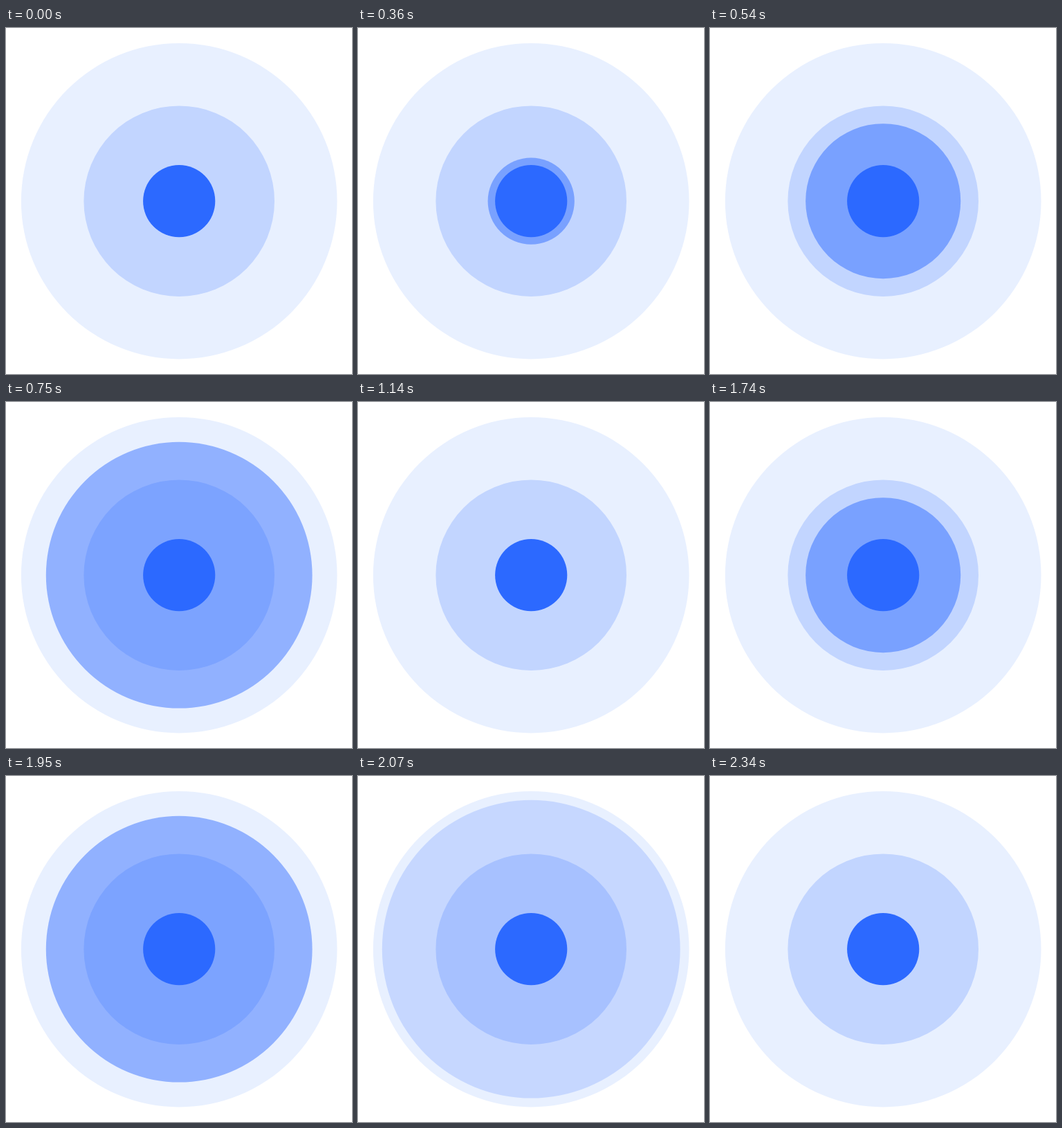
An HTML page for the animation above (2400 ms loop, 500 by 500 pixels).

```html
<!DOCTYPE html>
<html lang="en">
<head>
<meta charset="utf-8">
<title>Pulse</title>
<style>
  html, body { margin: 0; width: 100%; height: 100%; overflow: hidden; background: #fff; }
  svg { display: block; width: 100%; height: 100%; }
  circle { cx: 250.2px; cy: 250.2px; }
  .outer { r: 228.3px; fill: #e8f0ff; }
  .middle { r: 137.8px; fill: #c2d5ff; }
  .core, .pulse { fill: #2c69ff; }
  .core { r: 52.1px; }
  .pulse { r: 51.6px; opacity: .48; }
</style>
</head>
<body>
<svg viewBox="0 0 500 500">
  <circle class="outer"/>
  <circle class="middle"/>
  <circle class="pulse"/>
  <circle class="core"/>
</svg>
<script>
  const PERIOD = 1200;
  const STEP = 30;
  const EASE = 'cubic-bezier(.5, 0, .5, 1)';
  const pulse = document.querySelector('.pulse');

  // Hold `from` until `start`, ease to `to` by `end`, then hold.
  function tween(property, from, to, start, end) {
    const animation = pulse.animate([
      { [property]: from, offset: 0 },
      { [property]: from, offset: start / PERIOD, easing: EASE },
      { [property]: to, offset: end / PERIOD },
      { [property]: to, offset: 1 }
    ], { duration: PERIOD, fill: 'both' });
    animation.pause();
    return animation;
  }

  const tweens = [
    tween('r', '51.6px', '222.4px', 200, 1000),
    tween('opacity', .48, 0, 700, 1000)
  ];

  const startTime = performance.now();

  function draw() {
    const elapsed = performance.now() - startTime;
    const time = Math.floor(elapsed / STEP) * STEP % PERIOD;
    for (const animation of tweens) animation.currentTime = time;
    requestAnimationFrame(draw);
  }
  draw();
</script>
</body>
</html>
```
